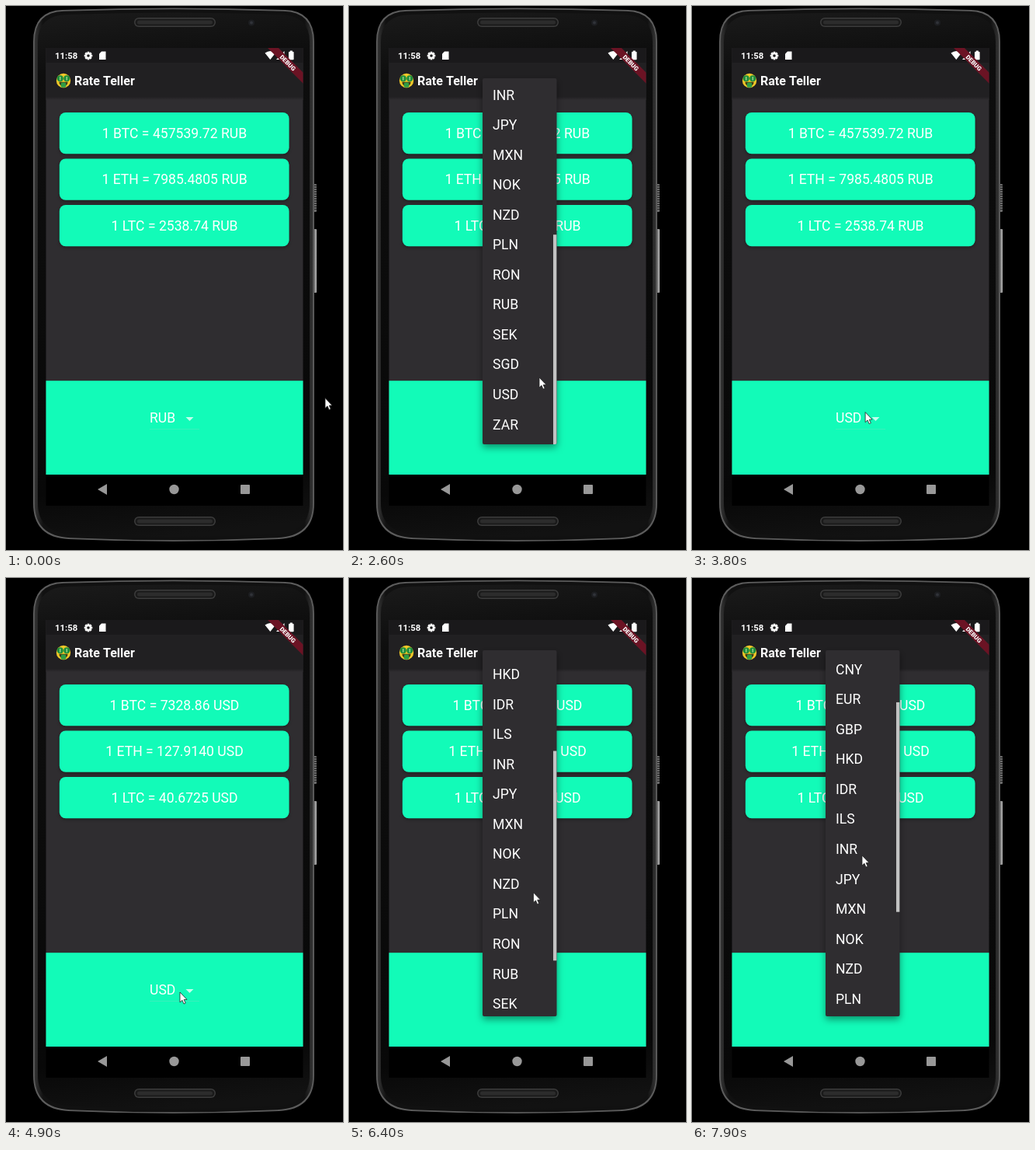
These frames come from a looping animation (434 px wide and 700 px high, 8000 ms). An HTML page with a canvas:

```html
<!DOCTYPE html>
<html lang="en">
<head>
<meta charset="utf-8">
<title>Rate Teller</title>
<style>
  html, body { margin: 0; width: 100%; height: 100%; overflow: hidden; background: #000; }
  canvas { display: block; width: 434px; height: 700px; }
</style>
</head>
<body>
<canvas id="stage" width="434" height="700"></canvas>
<script>
const ctx = document.getElementById('stage').getContext('2d');
const LOOP = 8000, STEP = 100;
const GREEN = '#12fbb8', PANEL = '#2f2d30', WHITE = '#fff', GREY = '#989898';
const CODES = ('AUD BRL CAD CNY EUR GBP HKD IDR ILS INR JPY MXN NOK NZD ' +
  'PLN RON RUB SEK SGD USD ZAR').split(' ');
const PRICES = {
  RUB: ['1 BTC = 457539.72', '1 ETH = 7985.4805', '1 LTC = 2538.74'],
  USD: ['1 BTC = 7328.86', '1 ETH = 127.9140', '1 LTC = 40.6725']
};
const MENU = { x: 172, y: 93, w: 95.5, h: 471, row: 38.55, pad: 6.4, anchor: 511 };
MENU.content = MENU.row * CODES.length + MENU.pad * 2;
MENU.maxScroll = MENU.content - MENU.h;

// Each menu lives from open to close; its chosen row starts over the button.
const SESSIONS = [
  { open: 1000, visible: 1300, close: 3500, end: 3600, code: 'RUB' },
  { open: 5458, visible: 5500, close: LOOP, end: LOOP, code: 'USD' }
];

// Pointer strokes; a drag scrolls the open menu by its height times the gain.
const POINTER = { x: 411, y: 504.5 };
const STROKES = [
  { from: 0, to: 500, x: 223, y: 531 },
  { from: 2000, to: 2500, x: 245, y: 478, drag: 2.8 },
  { from: 2600, to: 3100, x: 222, y: 509 },
  { from: 3500, to: 4050, x: 224, y: 533 },
  { from: 5800, to: 6200, x: 235, y: 310 },
  { from: 6200, to: 6700, x: 242, y: 579, drag: 1 },
  { from: 7000, to: 7400, x: 229, y: 422 },
  { from: 7400, to: 7900, x: 219, y: 357, drag: 1 }
];

const clamp = v => Math.max(0, Math.min(1, v));
const mix = (a, b, k) => a + (b - a) * k;
const ease = p => p * p * (3 - 2 * p);

function pointerAt(t) {
  return STROKES.reduce((at, s) => {
    const k = ease(clamp((t - s.from) / (s.to - s.from)));
    return { x: mix(at.x, s.x, k), y: mix(at.y, s.y, k) };
  }, POINTER);
}

function scrollAt(t, session) {
  const row = CODES.indexOf(session.code);
  const start = MENU.y + MENU.pad + MENU.row * row - MENU.anchor;
  const dragged = STROKES
    .filter(s => s.drag && s.from >= session.open && s.from < t)
    .reduce((sum, s) =>
      sum + s.drag * (pointerAt(s.from).y - pointerAt(Math.min(t, s.to)).y), 0);
  return Math.max(0, Math.min(MENU.maxScroll, start + dragged));
}

// The bar shows while scrolling, lingers, then fades.
function barAt(t, session) {
  const last = STROKES
    .filter(s => s.drag && s.from >= session.open && s.from < t).pop();
  return last ? clamp((last.to + 900 - t) / 300) : 0;
}

function paint(fill) {
  ctx.fillStyle = fill;
  ctx.fill();
}

function rect(x, y, w, h, fill) {
  ctx.fillStyle = fill;
  ctx.fillRect(x, y, w, h);
}

function round(x, y, w, h, r, fill) {
  ctx.beginPath();
  ctx.roundRect(x, y, w, h, r);
  paint(fill);
}

function disc(x, y, r, fill) {
  ctx.beginPath();
  ctx.arc(x, y, r, 0, Math.PI * 2);
  paint(fill);
}

function poly(points, fill) {
  ctx.beginPath();
  points.forEach(p => ctx.lineTo(...p));
  ctx.closePath();
  paint(fill);
}

function shadow(alpha, blur, drop) {
  ctx.shadowColor = `rgba(0,0,0,${alpha})`;
  ctx.shadowBlur = blur;
  ctx.shadowOffsetY = drop;
}

// Text is centred vertically on its capitals.
function label(text, x, y, size = 17.6, weight = 400, align = 'left') {
  ctx.font = `${weight} ${size}px Roboto, sans-serif`;
  ctx.textAlign = align;
  ctx.fillStyle = WHITE;
  ctx.fillText(text, x, y + size * 0.355);
}

function gradient(x0, y0, x1, y1, stops) {
  const g = ctx.createLinearGradient(x0, y0, x1, y1);
  stops.forEach(([at, colour]) => g.addColorStop(at, colour));
  return g;
}

// Phone outline with slightly bowed top and bottom edges.
function body(inset, fill) {
  const l = 35 + inset, r = 397 - inset, t = 3 + inset, b = 688 - inset;
  ctx.beginPath();
  ctx.moveTo(l, 46);
  ctx.quadraticCurveTo(l, t + 3, l + 38, t + 2);
  ctx.quadraticCurveTo(216, t - 3, r - 38, t + 2);
  ctx.quadraticCurveTo(r, t + 3, r, 46);
  ctx.lineTo(r, 640);
  ctx.quadraticCurveTo(r, b - 4, r - 46, b - 2);
  ctx.quadraticCurveTo(216, b + 4, l + 46, b - 2);
  ctx.quadraticCurveTo(l, b - 4, l, 640);
  paint(fill);
}

function drawPhone() {
  rect(0, 0, 434, 700, '#000');
  round(395, 229, 5, 36, 1, '#6a6a6a');
  for (let y = 231; y < 264; y += 3) rect(397, y, 3, 1, '#222');
  round(395, 287, 5, 82, 1, gradient(395, 0, 400, 0, [[0, '#444'], [1, '#bbb']]));

  body(0, '#5c5c5c');
  body(1.8, gradient(37, 0, 395, 0,
    [[0, '#343434'], [0.03, '#111'], [0.97, '#111'], [1, '#343434']]));
  body(6, gradient(60, 4, 130, 690,
    [[0, '#1b1b1b'], [0.12, '#0e0e0e'], [0.9, '#080808'], [1, '#121212']]));
  for (const y of [15, 657]) {
    round(165, y, 105, 12, 6, '#3c3c3c');
    round(166.5, y + 1.5, 102, 9, 4.5, '#1a1a1a');
    round(169, y + 3.5, 97, 5, 2.5, '#2c2c2c');
  }
  disc(316, 21.5, 4, '#1d1e21');
  disc(316, 21.5, 2, '#303238');
}

function drawStatusIcons() {
  label('11:58', 63, 64, 11.3, 700);
  ctx.save();
  ctx.translate(106, 64);
  for (let i = 0; i < 4; i++) {
    rect(-1.3, -5.3, 2.6, 10.6, WHITE);
    ctx.rotate(Math.PI / 4);
  }
  disc(0, 0, 4, WHITE);
  disc(0, 0, 1.8, '#1c1b1c');
  ctx.restore();
  poly([[123, 58.5], [128.5, 58.5], [128.5, 69], [120, 69], [120, 61.5]], WHITE);
  ctx.beginPath();
  ctx.moveTo(340.3, 69);
  ctx.lineTo(333.5, 60.5);
  ctx.quadraticCurveTo(340.3, 55.5, 347, 60.5);
  paint(WHITE);
  poly([[358.5, 58], [358.5, 69], [348, 69]], WHITE);
  rect(365.8, 57.5, 3, 2, WHITE);
  round(364, 58.7, 6.6, 10.6, 1, WHITE);
}

function drawBanner() {
  ctx.save();
  ctx.beginPath();
  ctx.rect(52, 54, 330.5, 60);
  ctx.clip();
  ctx.translate(363, 73);
  ctx.rotate(Math.PI / 4);
  rect(-40, -4.9, 80, 9.8, '#6b1324');
  label('DEBUG', 0, 0.2, 7.9, 900, 'center');
  ctx.restore();
}

function drawFace(x, y) {
  disc(x, y, 9.2, '#f0c828');
  for (const side of [-1, 1]) {
    disc(x + side * 4.2, y - 2.8, 4, '#1f8f3c');
    rect(x + side * 4.2 - 0.5, y - 5, 1, 4.6, '#d8eeb0');
  }
  ctx.beginPath();
  ctx.arc(x, y + 1.8, 5.6, 0, Math.PI);
  paint('#3c3a18');
  round(x - 3.2, y + 2.6, 6.4, 6.2, 1.5, '#2f9c45');
}

function drawScreen(t) {
  const selected = t >= SESSIONS[0].close ? 'USD' : 'RUB';
  const quoted = t >= 4800 ? 'USD' : 'RUB';
  rect(51.5, 54, 331, 549, PANEL);
  rect(51.5, 54, 331, 67, gradient(0, 117, 0, 121, [[0, '#212022'], [1, PANEL]]));
  rect(51.5, 54, 331, 19, '#1a191b');
  drawStatusIcons();
  drawFace(74, 96);
  label('Rate Teller', 88, 96, 16.06, 600);
  drawBanner();

  PRICES[quoted].forEach((price, i) => {
    const y = 137 + i * 59.5;
    ctx.save();
    shadow(0.35, 4, 1.5);
    round(68.8, y, 295.8, 53.3, 8, GREEN);
    ctx.restore();
    label(`${price} ${quoted}`, 217, y + 26.5, 17.6, 400, 'center');
  });

  rect(51.5, 482.2, 331, 120.8, GREEN);
  label(selected, 185, 530);
  poly([[231.5, 529], [241.5, 529], [236.5, 534]], 'rgba(255,255,255,.75)');
  rect(185, 544, 64, 1, 'rgba(189,200,196,.22)');

  rect(51.5, 603, 331, 40, '#000');
  poly([[118, 622], [130, 615], [130, 629]], GREY);
  disc(216.5, 622, 6.2, GREY);
  round(302, 616, 12, 12, 1, GREY);
}

function drawMenu(t) {
  const session = SESSIONS.find(s => t >= s.visible && t < s.end);
  if (!session) return;
  const open = clamp((t - session.open) / 300);
  const fade = t >= session.close ? 0.4 : clamp(open * 4);
  const current = CODES.indexOf(session.code);
  const scroll = scrollAt(t, session);
  const rowY = i => MENU.y + MENU.pad + MENU.row * i - scroll;

  const grow = clamp(open * 4 - 1);
  const top = mix(rowY(current), MENU.y, grow);
  const bottom = mix(rowY(current) + MENU.row, MENU.y + MENU.h, grow);

  ctx.save();
  ctx.globalAlpha = fade;
  shadow(0.42, 10, 4);
  round(MENU.x, top, MENU.w, bottom - top, 2, PANEL);
  ctx.shadowColor = 'transparent';
  ctx.clip();

  // Rows appear one after another, the chosen one at once.
  const unit = 0.5 / (CODES.length + 1.5);
  CODES.forEach((code, i) => {
    const start = 0.5 + (i + 1) * unit;
    const shown = i === current ? 1 : clamp((open - start) / (1.5 * unit));
    ctx.globalAlpha = fade * shown;
    label(code, 185, rowY(i) + MENU.row / 2);
  });

  const ratio = MENU.h / MENU.content;
  ctx.globalAlpha = fade * barAt(t, session);
  rect(263, MENU.y + scroll * ratio, 4.7, MENU.h * ratio, '#c2c2c2');
  ctx.restore();
}

function drawPointer(t) {
  const { x, y } = pointerAt(t);
  ctx.save();
  ctx.translate(x, y);
  poly([[0, 0], [0, 13], [3, 10.3], [5, 15], [7.2, 14], [5.2, 9.6], [9, 9.4]], WHITE);
  ctx.strokeStyle = '#222';
  ctx.lineWidth = 0.8;
  ctx.stroke();
  ctx.restore();
}

function frame(now) {
  const t = Math.floor((now % LOOP) / STEP) * STEP;
  drawPhone();
  drawScreen(t);
  drawMenu(t);
  drawPointer(t);
  requestAnimationFrame(frame);
}
requestAnimationFrame(frame);
</script>
</body>
</html>
```
